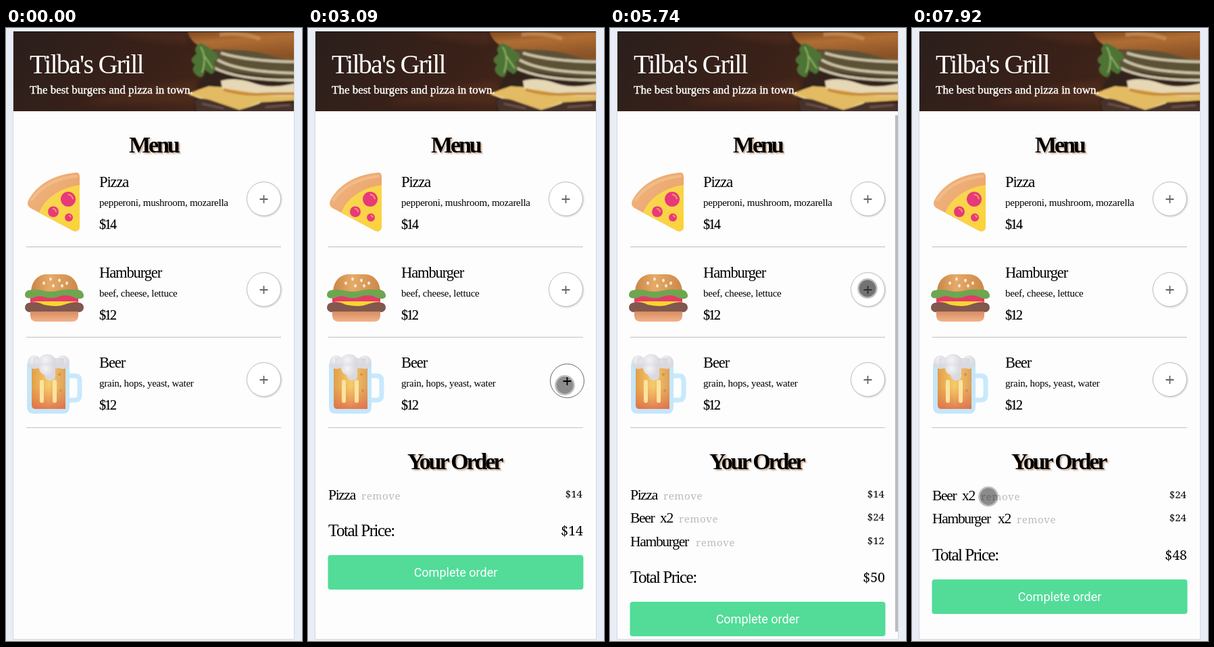
Write an HTML page that moves like this. It is 438x906 px and loops after 8 s.

```html
<!DOCTYPE html>
<html lang="en">
<head>
<meta charset="utf-8">
<title>Diner order</title>
<style>
  html, body { margin: 0; width: 100%; height: 100%; overflow: hidden; background: #e9edf6; }
  svg { display: block; width: 100vw; height: 100vh; }
  text { font-family: "Liberation Serif", serif; white-space: pre; }
  .brand { font-size: 40px; letter-spacing: -1.8px; fill: #fff; }
  .tagline { font-size: 17px; fill: #fff; stroke: #fff; stroke-width: .4; }
  .head { font-size: 34px; font-weight: bold; letter-spacing: -3.1px; text-shadow: 2px 2px 2px #c9ab94; }
  .name { font-size: 22.5px; letter-spacing: -1.1px; }
  .desc { font-size: 15px; letter-spacing: -.25px; }
  .cost { font-size: 20px; letter-spacing: -2px; stroke: #000; stroke-width: .2; }
  .item { font-size: 21.5px; letter-spacing: -1.3px; }
  .total { font-size: 25px; letter-spacing: -1.5px; }
  .remove { font: 15px "Noto Serif", serif; letter-spacing: .6px; fill: #b9bdb9; }
  .remove.down { letter-spacing: 2.6px; fill: #a4a8a4; }
  .price, .sum { font: 15px "Noto Serif", serif; text-anchor: end; }
  .sum { font-size: 19.5px; }
  .pay { font: 18px Roboto, sans-serif; fill: #fff; text-anchor: middle; }
  .add circle { fill: #fff; stroke: #bdbdbd; filter: drop-shadow(1px 1px 1px #ccc); }
  .add path { stroke: #666; stroke-width: 1.8; }
  .add.down circle { stroke: #666; filter: none; }
  .add.down path { stroke: #000; }
</style>
</head>
<body>
<svg viewBox="0 0 438 906">
  <defs>
    <linearGradient id="wood" x2="1" y2=".25">
      <stop stop-color="#2a1f1c"/><stop offset=".3" stop-color="#33201a"/>
      <stop offset=".6" stop-color="#3a2118"/><stop offset="1" stop-color="#4a2a1a"/>
    </linearGradient>
    <linearGradient id="loaf" x2=".3" y2="1">
      <stop stop-color="#6e3d1c"/><stop offset=".45" stop-color="#b06e33"/><stop offset="1" stop-color="#8a5228"/>
    </linearGradient>
    <linearGradient id="crust" x2="1" y2="1"><stop stop-color="#f0b580"/><stop offset="1" stop-color="#e9a065"/></linearGradient>
    <linearGradient id="cheese" x2="1" y2="1"><stop stop-color="#f8d75b"/><stop offset="1" stop-color="#fbd238"/></linearGradient>
    <linearGradient id="bun" x2="1" y2="0"><stop stop-color="#c98547"/><stop offset=".4" stop-color="#e6aa68"/><stop offset="1" stop-color="#cc8848"/></linearGradient>
    <linearGradient id="base" x2="0" y2="1"><stop stop-color="#d98c62"/><stop offset="1" stop-color="#f2b48a"/></linearGradient>
    <linearGradient id="ale"><stop stop-color="#e39d49"/><stop offset=".5" stop-color="#f5cb69"/><stop offset="1" stop-color="#dfa05a"/></linearGradient>
    <linearGradient id="glow" x2="0" y2="1"><stop stop-color="#e2754c" stop-opacity="0"/><stop offset="1" stop-color="#dd6249"/></linearGradient>
    <radialGradient id="foam" cx=".4" cy=".3"><stop stop-color="#f4f4f6"/><stop offset="1" stop-color="#d9d9df"/></radialGradient>
    <filter id="soft"><feGaussianBlur stdDeviation="1"/></filter>
    <filter id="haze" x="-20%" y="-50%" width="140%" height="200%"><feGaussianBlur stdDeviation="5"/></filter>
    <clipPath id="banner"><path d="M11 5H426V123H11Z"/></clipPath>
    <clipPath id="slice"><path d="M109 232V294Q108 302 100 300L49 273C57 252 80 236 109 232Z"/></clipPath>
  </defs>

  <path d="M10.5 5.5H426.5V903.5H10.5Z" fill="#fdfdfe" stroke="#d3d7df"/>

  <g clip-path="url(#banner)">
    <path d="M11 5H426V123H11Z" fill="url(#wood)"/>
    <path d="M110 112Q200 84 280 78V112ZM150 5Q210 20 270 24V5Z" fill="#623620" opacity=".4" filter="url(#haze)"/>
    <g filter="url(#soft)">
      <path d="M280 123Q274 92 300 60L310 26H440V130H280Z" fill="#33221b"/>
      <path d="M300 34Q350 26 440 44V74Q350 72 300 56Z" fill="#5d5136"/>
      <path d="M313 47Q345 66 440 67M318 37Q360 50 440 50M306 58Q345 78 430 77" fill="none" stroke="#c9c1a6" stroke-width="4"/>
      <path d="M268 97L300 86L440 96V106L376 110L345 122Z" fill="#e3bb62"/>
      <path d="M272 98L345 122L376 110" fill="none" stroke="#f3d88e" stroke-width="2"/>
      <path d="M318 78Q340 72 368 82T440 78V98Q400 104 370 97T320 90Z" fill="#e6d7b5"/>
      <path d="M322 91Q350 99 374 98T440 97" fill="none" stroke="#c98b35" stroke-width="4"/>
      <path d="M279 108Q286 101 304 107L345 121L378 111H440V130H284Z" fill="#46302b"/>
      <path d="M290 112L322 119M384 117L420 114" stroke="#6d5048" stroke-width="3"/>
      <path d="M268 0Q270 26 304 32Q360 30 390 40T440 48V0Z" fill="url(#loaf)"/>
      <path d="M316 10Q350 6 376 16" fill="none" stroke="#d39a5c" stroke-width="6" opacity=".6"/>
      <path d="M287 22Q276 30 282 38Q268 48 280 54Q272 62 282 70Q292 78 294 62L304 68Q314 62 306 50Q318 46 310 37Q300 26 287 22Z" fill="#4d7336"/>
      <path d="M288 28Q298 44 290 66M294 42L306 60" fill="none" stroke="#93b268" stroke-width="2"/>
    </g>
  </g>
  <path d="M11 5.5H426" stroke="#111"/>
  <text class="brand" x="35" y="67">Tilba's Grill</text>
  <text class="tagline" x="35" y="97">The best burgers and pizza in town.</text>
  <text class="head" x="182" y="184">Menu</text>

  <g id="pizza">
    <path d="M101 214Q109 212 109 220V294Q108 302 100 300L36 266Q30 262 33 255C45 232 70 217 101 214Z" fill="url(#crust)"/>
    <path d="M38 254C52 234 75 222 104 219" fill="none" stroke="#f8cfa3" stroke-width="4" stroke-linecap="round" opacity=".4"/>
    <g clip-path="url(#slice)">
      <path d="M45 225H110V303H45Z" fill="url(#cheese)"/>
      <g fill="#e8397a"><circle cx="92" cy="253" r="11"/><circle cx="70" cy="271.5" r="8"/><circle cx="93" cy="280" r="6"/></g>
      <path d="M92 246a8 8 0 0 1 7 7M69 267a5 5 0 0 1 5 5M93 277a4 4 0 0 1 3 3" fill="none" stroke="#f4a05c" stroke-width="2"/>
    </g>
  </g>

  <g id="burger">
    <path d="M37 394C36 374 48 364 60 364H84C98 364 108 376 107 394Z" fill="url(#bun)"/>
    <g id="seeds" fill="#f8ead8"></g>
    <path d="M36 394H107V407H36Z" fill="#e43a68"/>
    <rect x="28" y="406" width="87" height="14" rx="7" fill="#80584d"/>
    <path d="M34 404H110Q96 405 86 409T56 409Q46 404 34 404Z" fill="#fbd431"/>
    <path d="M32 388Q42 385 54 388T78 388T100 387Q108 385 113 390Q118 398 111 400Q104 401 98 397Q88 393 78 397T58 398Q48 394 40 399Q29 401 28 395Q28 390 32 388Z" fill="#6ea650"/>
    <path d="M36 419H107V426Q106 434 98 434H45Q37 434 36 426Z" fill="url(#base)"/>
  </g>

  <g id="beer">
    <path d="M92 514H102Q109 514 109 522V542Q109 550 101 550H92" fill="none" stroke="#c8e9fc" stroke-width="7"/>
    <path d="M31 496H94V560Q94 570 84 570H41Q31 570 31 560Z" fill="#c5e6fa"/>
    <path d="M38 500H88V563H44Q38 563 38 557Z" fill="url(#ale)"/>
    <path d="M38 530H88V563H44Q38 563 38 557Z" fill="url(#glow)" opacity=".75"/>
    <path d="M53 523V551M72 523V551" stroke="#fbe3a0" stroke-width="6" stroke-linecap="round"/>
    <g fill="#d4914b"><circle cx="79" cy="512" r="2"/><circle cx="81" cy="536" r="2"/></g>
    <g fill="url(#foam)"><circle cx="42" cy="494" r="10"/><circle cx="84" cy="494" r="10"/><path d="M40 488H86V503H40Z"/><circle cx="61" cy="496" r="14"/><path d="M49 496H73V514Q73 521 65 521Q59 521 57 513Q49 510 49 502Z"/></g>
  </g>

  <g id="menu"></g>
  <g id="order"></g>
  <rect id="bar" x="422" y="129" width="4" height="763" fill="#bcbcbc"/>
  <g id="cursor">
    <circle r="12.4" fill-opacity=".45"/>
    <circle r="13.6" fill="none" stroke="#000" stroke-opacity=".25" stroke-width="2.6"/>
  </g>
</svg>
<script>
const LOOP = 8000;
const $ = id => document.getElementById(id);
const text = (cls, x, y, s) => `<text class="${cls}" x="${x}" y="${y}">${s}</text>`;

const dishes = [
  ['Pizza', 'pepperoni, mushroom, mozarella', 14],
  ['Hamburger', 'beef, cheese, lettuce', 12],
  ['Beer', 'grain, hops, yeast, water', 12],
];
const pitch = 133.6;
$('menu').innerHTML = dishes.map(([name, desc, cost], i) => {
  const y = Math.round(i * pitch);
  return text('name', 138, 235 + y, name) + text('desc', 138, 263 + y, desc) +
    text('cost', 138, 297 + y, '$' + cost) +
    `<path d="M30 ${323.5 + i * pitch}H407" stroke="#bdbdbd"/>
     <g class="add"><circle cx="381.5" cy="${252.5 + y}" r="25"/>
     <path d="M375.5 ${253 + y}h12m-6 -6v12"/></g>`;
}).join('');
const buttons = [...document.querySelectorAll('.add')];

$('seeds').innerHTML = [[66, 371], [56, 377], [79, 373], [90, 377], [70, 381], [83, 381]]
  .map(([x, y]) => `<ellipse cx="${x}" cy="${y}" rx="1.9" ry="2.5"/>`).join('');

// Order lines: [label, x of the count, x of "remove", count, price]
const pizza = ['Pizza', 0, 79, 1, 14];
const beer = n => ['Beer', 74, n > 1 ? 102 : 74, n, 12 * n];
const burger = n => ['Hamburger', 127, n > 1 ? 155 : 127, n, 12 * n];
const orders = [
  [0, []],
  [1870, [pizza]],
  [3200, [pizza, beer(1)]],
  [3930, [pizza, beer(2)]],
  [5290, [pizza, beer(2), burger(1)]],
  [6070, [pizza, beer(2), burger(2)]],
  [7920, [beer(2), burger(2)], 1],
];

// Times a button is held: [button, from, to]
const holds = [[0, 1610, 1870], [2, 3090, 3400], [2, 3800, 4130], [1, 5060, 5460], [1, 5890, 6130]];
const presses = [1470, 2940, 3660, 5740, 7590];

// Pointer moves: start, end, steps, path
const moves = [
  [530, 1010, 7, [[408, 298], [391, 270], [383, 259]]],
  [1470, 1471, 2, [[383, 259], [382, 258]]],
  [1870, 2650, 12, [[380, 264], [362, 390], [360, 478], [368, 512], [378, 536]]],
  [2730, 2790, 2, [[379, 533], [380, 528]]],
  [3660, 3661, 2, [[380, 528], [381, 528.5]]],
  [4460, 5060, 9, [[381, 505], [378, 425], [380, 359], [382, 386]]],
  [5740, 5741, 2, [[382, 386], [381, 385]]],
  [6070, 6330, 5, [[355, 420], [200, 600], [99, 718]]],
  [6670, 7090, 6, [[100, 721], [118, 702], [114, 686]]],
  [7260, 7330, 2, [[113, 690], [113, 692.5]]],
];

function pointer(t) {
  const move = moves.filter(m => m[0] <= t).pop();
  if (!move) return null;
  const [start, end, steps, path] = move;
  const k = Math.floor(Math.min(1, (t - start) / (end - start)) * (steps - 1) + 1e-6);
  const p = k / (steps - 1) * (path.length - 1);
  const i = Math.min(Math.floor(p), path.length - 2);
  return path[i].map((v, n) => v + (path[i + 1][n] - v) * (p - i));
}

function orderMarkup(rows, shift, removing) {
  if (!rows.length) return '';
  const drop = Math.round((rows.length - 1) * 34.5) + shift;
  const lines = rows.map(([label, countX, removeX, count, price], i) => {
    const y = Math.round(697 + i * 34.4) + shift;
    return text('item', 30, y, label) + (count > 1 ? text('item', countX, y, 'x' + count) : '') +
      text(removing && !i ? 'remove down' : 'remove', removeX, y, 'remove') +
      text('price', 406, y - 3, '$' + price);
  }).join('');
  const sum = rows.reduce((s, r) => s + r[4], 0);
  return text('head', 147, 652, 'Your Order') + lines +
    text('total', 30, 751 + drop, 'Total Price:') + text('sum', 407, 750 + drop, '$' + sum) +
    `<rect x="29.5" y="${779 + drop}" width="378" height="51" rx="4" fill="#52dc98"/>` +
    text('pay', 218.5, 811 + drop, 'Complete order');
}

let shown;
function draw(now) {
  const t = now % LOOP;
  const [, rows, shift = 0] = orders.filter(o => o[0] <= t).pop();
  const markup = orderMarkup(rows, shift, t >= 7660 && t < 7920);
  if (markup !== shown) $('order').innerHTML = shown = markup;
  $('bar').style.display = rows.length > 2 ? '' : 'none';

  buttons.forEach((b, i) => {
    const down = holds.some(([n, from, to]) => n === i && t >= from && t < to);
    b.setAttribute('class', down ? 'add down' : 'add');
    b.setAttribute('transform', down ? 'translate(2 2)' : '');
  });

  const at = pointer(t), cursor = $('cursor');
  cursor.style.display = at ? '' : 'none';
  if (at) cursor.setAttribute('transform', `translate(${at})`);
  const pressed = presses.some(s => t >= s && t < s + 140);
  cursor.firstElementChild.setAttribute('fill-opacity', pressed ? .55 : .45);
  requestAnimationFrame(draw);
}
requestAnimationFrame(draw);
</script>
</body>
</html>
```
